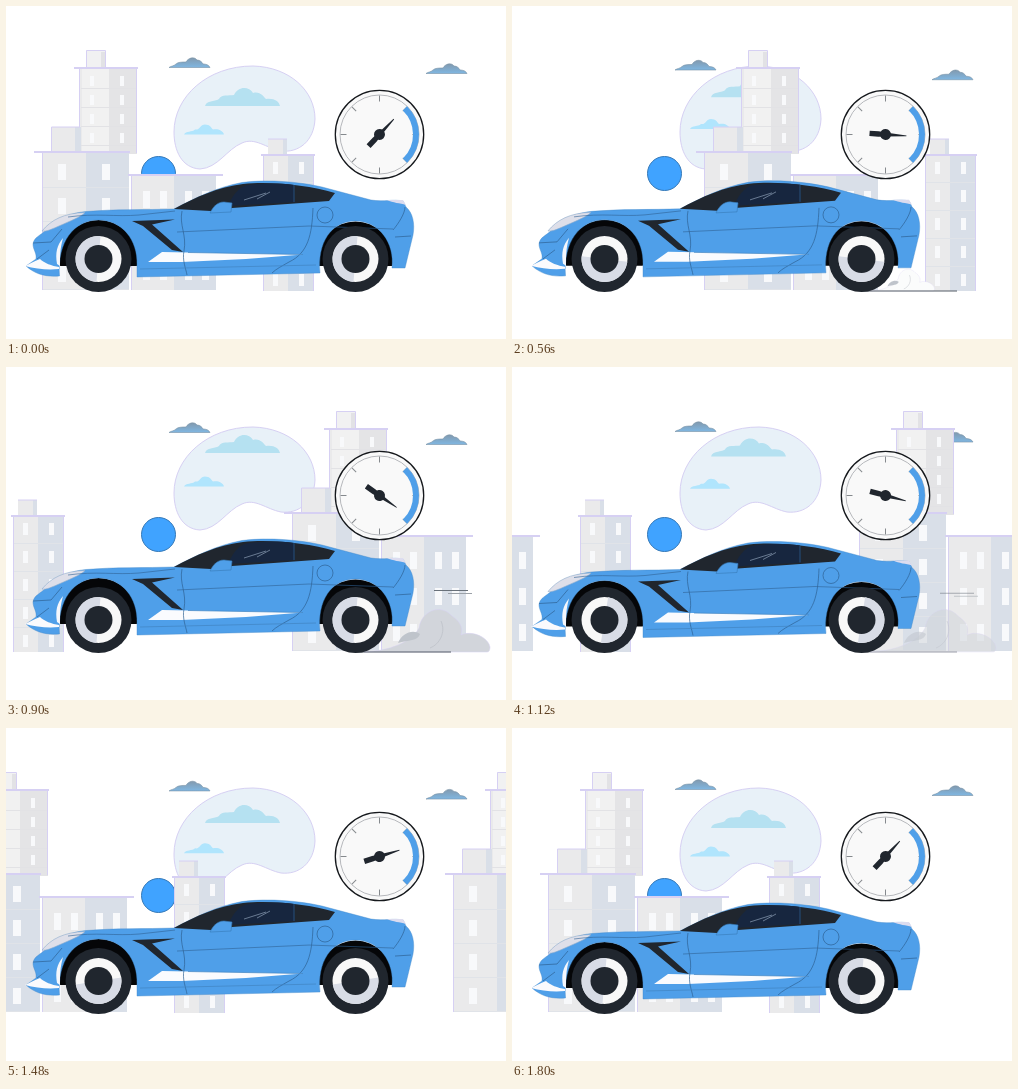
Write an HTML page with a canvas that moves like this. It is 500 px wide and 333 px high and loops after 1820 ms.

```html
<!DOCTYPE html>
<html lang="en">
<head>
<meta charset="utf-8">
<title>City drive</title>
<style>
html, body { margin: 0; width: 100%; height: 100%; overflow: hidden; background: #fff; }
canvas { display: block; width: 500px; height: 333px; }
</style>
</head>
<body>
<canvas id="stage" width="500" height="333"></canvas>
<script>
const c = document.getElementById('stage').getContext('2d');
const LOOP = 1820, STEP = 20, CYCLE = 1800, WIDTH = 500;
const BLUE = '#4f9fe9', DARK = '#20262e', LILAC = '#d6d0f3';
const LIGHT = '#eaeaeb', SHADE = '#d9dfe8', INK = '#2f6294';

const clamp = v => Math.min(1, Math.max(0, v));

function shape(d, fill, stroke, w = 1) {
  const p = new Path2D(d);
  if (fill) { c.fillStyle = fill; c.fill(p); }
  if (stroke) { c.strokeStyle = stroke; c.lineWidth = w; c.stroke(p); }
}
function box(x, y, w, h, fill) {
  c.fillStyle = fill;
  c.fillRect(x, y, w, h);
}
function disc(x, y, r, fill, stroke, w = 1) {
  c.beginPath();
  c.arc(x, y, r, 0, Math.PI * 2);
  if (fill) { c.fillStyle = fill; c.fill(); }
  if (stroke) { c.strokeStyle = stroke; c.lineWidth = w; c.stroke(); }
}
function at(x, y, draw) {
  c.save();
  c.translate(x, y);
  draw();
  c.restore();
}
function windows(xs, y, w, h, pitch, rows) {
  for (const x of xs)
    for (let i = 0; i < rows; i++) box(x, y + i * pitch, w, h, '#f8f9fb');
}

// Two-tone block with a ledge on top
function block(x, mid, right, y, bottom, ledgeL, ledgeR, shade = SHADE) {
  box(x, y, mid - x, bottom - y, LIGHT);
  box(mid, y, right - mid, bottom - y, shade);
  box(x, y, 1, bottom - y, LILAC);
  box(ledgeL, y - 2, ledgeR - ledgeL, 2, LILAC);
}

function city() {
  // tower
  box(80, 44, 19, 18, '#f1f1f2');
  box(95, 46, 4, 16, '#e2e2e5');
  shape('M80.5 62V44.5H99.5V62', null, LILAC);
  block(73, 103, 131, 63, 148, 68, 132, '#e4e4e6');
  box(76, 63, 27, 84, '#f1f1f1');
  box(130, 63, 1, 84, LILAC);
  for (let y = 82; y < 146; y += 19) box(75, y, 55, 1, '#e2e2e5');
  windows([84], 70, 4, 10, 19, 4);
  windows([114], 70, 4, 10, 19, 4);
  box(45, 121, 28, 26, LIGHT);
  box(69, 121, 6, 26, SHADE);
  shape('M45.5 146V121H74', null, LILAC);
  block(36, 80, 123, 147, 284, 28, 124);
  for (let y = 181; y < 284; y += 34) box(37, y, 86, 1, '#e0e3e8');
  windows([52, 96], 158, 8, 16, 34, 4);

  // low house
  block(125, 168, 210, 170, 284, 122, 217);
  windows([137, 154, 179, 196], 185, 7, 17, 36, 3);

  // slim house
  box(262, 133, 15, 16, LIGHT);
  box(277, 133, 4, 16, SHADE);
  shape('M262 133H281', null, LILAC);
  block(257, 282, 308, 150, 285, 255, 309);
  box(307, 150, 1, 135, LILAC);
  for (let y = 176; y < 284; y += 28) box(258, y, 49, 1, '#e0e3e8');
  windows([267, 293], 156, 5, 12, 28, 5);
}

function smallCloud(x, y) {
  at(x, y, () => {
    const g = c.createLinearGradient(0, 0, 0, 11);
    g.addColorStop(0, '#8297aa');
    g.addColorStop(1, '#7fb8e4');
    shape('M0 10.5C2 9 5 9 7 7C9 5 13 5 17 5C19 1 25 -1 28 3C31 3 33 5 34 7C37 7 40 8 41 10.5Z', g, '#7890a5', .6);
  });
}

function blob() {
  shape('M168 126C168 91 201 60 247 60C284 61 309 85 309 113C308 135 293 147 275 145C260 142 249 131 236 137C221 143 212 162 194 163C176 162 168 145 168 126Z', '#e8f1f8', LILAC, 1);
}
function paleClouds(k) {
  at(199, 82 - 14 * k, () => shape('M0 18C2 12 9 14 14 11C16 6 24 8 29 7C33 -2 44 -2 48 5C55 3 58 8 61 11C69 10 74 13 75 18Z', '#b5e1f1'));
  at(178, 118.5 - 9 * k, () => shape('M0 10C2 6 8 8 11 5C16 6 16 0 21 0C26 0 27 3 29 5C34 4 39 6 40 10Z', '#b0e5fd'));
}

// A pale puff that spreads, darkens and then fades
function smoke(t) {
  const grow = clamp((t - 480) / 320);
  const fade = clamp((1300 - t) / 330);
  if (!grow || !fade) return;
  const tone = clamp((t - 540) / 240);
  const size = .35 + .65 * grow;
  const mix = (a, b) => Math.round(a + (b - a) * tone);
  c.save();
  c.globalAlpha = fade;
  at(358, 285, () => {
    c.scale(size, size);
    shape('M0 0C25 -1 48 -10 55 -24C58 -43 78 -48 88 -36C97 -30 99 -24 97 -17C108 -22 124 -15 126 -5C126 -2 125 0 123 0Z',
      `rgb(${mix(255, 210)},${mix(255, 213)},${mix(255, 219)})`, LILAC, .5);
    shape('M34 -9C38 -19 49 -23 56 -18C54 -11 44 -12 34 -9Z', '#bfc4cb');
    shape('M66 -4C76 -8 82 -20 77 -31', null, '#c2c6cd');
  });
  if (t > 720) {
    box(428, 223 + (t - 900) / 80, 34, 1, '#69717a');
    box(442, 226 + (t - 900) / 80, 24, 1, '#9ba1a8');
  }
  box(350, 284.5, 35 + 60 * clamp(grow * 5), 1, '#555d66');
  c.restore();
}

// Black wheel opening with a flat lower edge
function arch(x, r) {
  c.save();
  c.beginPath();
  c.rect(x - r, 200, 2 * r, 60);
  c.clip();
  disc(x, 253, r, '#050608');
  c.restore();
}

function carBody() {
  arch(92.5, 39);
  arch(349.5, 37.5);
  shape('M27 238C28 231 34 230 40 224C51 213 64 207 80 205.5C108 203 140 204 168 203C190 192 208 182 236 176.5C263 173 294 176 316 181L365 194C378 196 387 193 397 195L400 201C407 207 409 218 407 229L399 262L386 262C389 237 373 215 349.5 215C325 215 311 237 314 267L131 271L131 259C132 234 116 214 92.5 214C68 214 51 236 53.5 270C41 271 30 269 20 260L30 253C31 247 27 244 27 238Z', BLUE, '#4186c7', .4);

  // lamps and bumper
  shape('M36 225C45 214 58 207 79 206.5C75 211 64 215 53 220C46 223 40 226 36 225Z', '#dedfe9', '#8faecd', .6);
  shape('M19 260C24 258 28 255 34 253C38 257 46 260 53 261V263C42 264 30 263 19 260Z', '#fafafd');
  shape('M51 258C49 247 51 239 57 232C54 243 54 250 54 260Z', '#f5f7fc');
  shape('M27 237L45 236L56 223M31 253L43 244', null, INK, .7);
  shape('M381 194L397 194L400 199C394 197 387 197 381 194Z', '#dcdcef');

  // glass
  shape('M168 203C190 191 212 181 237 178C264 175 302 179 329 187L323 195L226 202L205 205Z', DARK);
  shape('M222 200C226 190 232 182 240 179.5C257 177 273 177 288 179L289 196Z', '#17263f');
  shape('M238 194L260 187M251 193L264 186', null, '#8da0b7', .7);
  shape('M204 207C207 201 211 196 218 196L226 197L225 206Z', BLUE, '#387bb8', .6);

  // vent and side stripe
  shape('M126 215L169 213.5L146 218.5L177 246L166 244L137 220Z', DARK);
  shape('M142 256L156 246L182 246.5L297 248.5L240 253L176 256Z', '#fafbfe');

  // seams
  shape('M176 205C173 219 181 229 178 245C176 254 180 263 181 269', null, INK, .7);
  shape('M307 202C306 229 302 247 283 256C276 260 270 263 266 267', null, INK, .7);
  shape('M171 226L303 220L387 223M62 211C90 207 110 211 133 209L169 205', null, INK, .6);
  shape('M182 246.5L297 248.5M134 263L310 259', null, '#4184c2', .7);
  shape('M288 179V196M387 224C393 217 399 207 399 201M389 231L405 230', null, INK, .7);
  disc(319, 209, 8, null, INK, .7);
}

function wheel(x, turn) {
  disc(x, 253, 33, DARK);
  disc(x, 253, 23, '#f8f8f8');
  c.beginPath();
  c.arc(x, 253, 23, turn - Math.PI / 2, turn + Math.PI / 2);
  c.fillStyle = '#d8dce6';
  c.fill();
  disc(x, 253, 14, DARK);
}

function gauge(k) {
  at(373.5, 128.5, () => {
    disc(0, 0, 44.2, '#f9f9f9', '#15181c', 1.3);
    disc(0, 0, 39.5, null, '#a5a8ac', .8);
    for (let i = 0; i < 8; i++) {
      c.save();
      c.rotate(i * Math.PI / 4);
      box(33, -.5, 6, 1, '#85898d');
      c.restore();
    }
    c.beginPath();
    c.arc(0, 0, 36.5, -.8, .8);
    c.lineWidth = 6;
    c.strokeStyle = BLUE;
    c.stroke();
    c.rotate((-47 + 82 * k) * Math.PI / 180);
    shape('M-16 -2.7H-7L0 -2L21 -.4V.4L0 2L-7 2.7H-16Z', DARK);
    disc(0, 0, 5.5, DARK);
  });
}

function draw(t) {
  const p = (t % CYCLE) / CYCLE;
  const k = 1 - Math.abs(1 - 2 * p);
  const bounce = -1.5 * (1 - Math.cos(p * 6 * Math.PI));
  const turn = 3.23 - p * 8 * Math.PI;

  box(0, 0, WIDTH, 333, '#fff');
  blob();
  paleClouds(k);
  smallCloud(163, 51 + 4 * k);
  smallCloud(420, 57 + 10 * k);
  disc(152.5, 167.5, 17, '#40a3ff', '#3579b8', 1);
  for (const shift of [-WIDTH, 0]) at(Math.round(shift + p * WIDTH), 0, city);
  smoke(t);
  at(0, bounce, carBody);
  wheel(92.5, turn);
  wheel(349.5, turn);
  gauge(k);
}

function frame(now) {
  draw(Math.floor((now % LOOP) / STEP) * STEP);
  requestAnimationFrame(frame);
}
draw(0);
requestAnimationFrame(frame);
</script>
</body>
</html>
```
